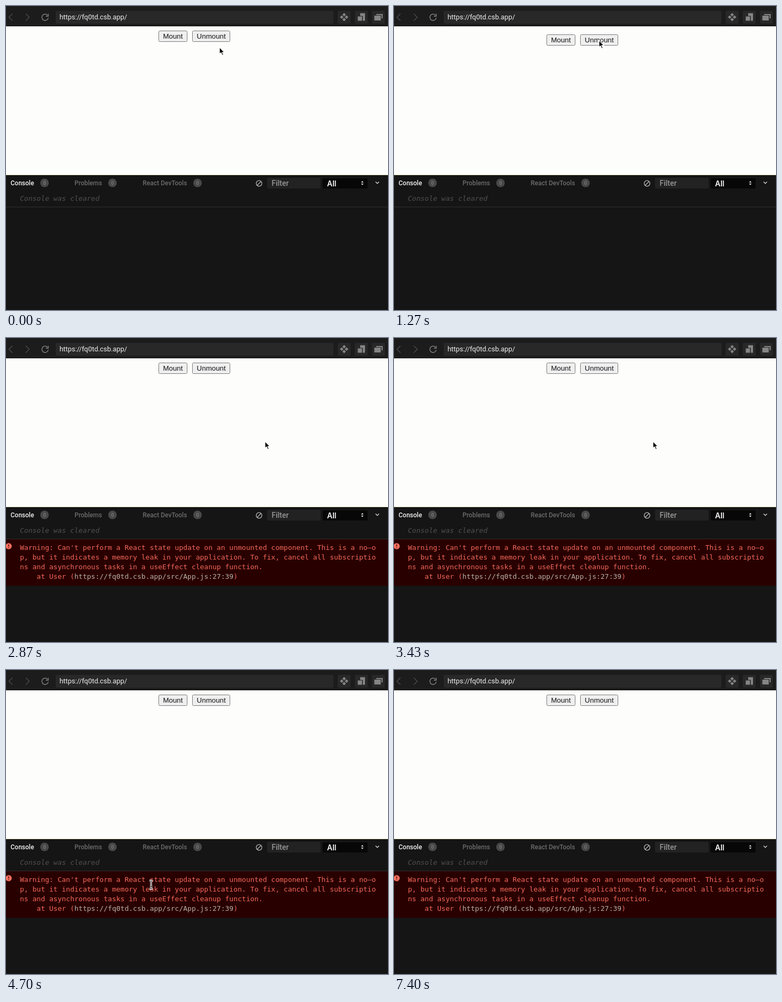
These frames come from a looping animation (714 px wide and 568 px high, 7.43 s). An HTML page:

```html
<!DOCTYPE html>
<html lang="en">
<head>
<meta charset="utf-8">
<title>Console warning</title>
<style>
html, body { margin: 0; width: 100%; height: 100%; overflow: hidden; background: #151515; }
svg { display: block; width: 714px; height: 568px; }
text { white-space: pre; }
.ui { font: 500 12px Roboto, sans-serif; }
.btn { font: 13.333px "Liberation Sans", Arial, sans-serif; fill: #111; }
.btn rect { fill: #efefef; stroke: #7c7c7c; }
.mono { font: 13px "DejaVu Sans Mono", monospace; }
.line { fill: none; stroke-width: 1.3; }
</style>
</head>
<body>
<svg viewBox="0 0 714 568">
  <rect width="714" height="568" fill="#151515"/>

  <!-- address bar -->
  <rect width="714" height="38" fill="#1c1c1c"/>
  <rect x="93" y="9" width="519" height="24" rx="2" fill="#282828"/>
  <g class="line" stroke="#4c4c4c">
    <path d="M12 14.500L5.500 21L12 27.500M37 14.500L43.500 21L37 27.500"/>
    <path d="M77.500 17A6 6 0 1 0 79 22M79 14.500V19H74.500" stroke="#8a8a8a"/>
  </g>
  <text x="100" y="25" class="ui" style="font-size:12.9px;font-weight:400" fill="#f0f0f0">https://fq0td.csb.app/</text>
  <g fill="#282828">
    <rect x="620" y="9" width="24" height="24" rx="2"/>
    <rect x="652" y="9" width="24" height="24" rx="2"/>
    <rect x="684" y="9" width="24" height="24" rx="2"/>
  </g>
  <g fill="#858585">
    <path d="M632 13l3.300 3.300-3.300 3.300-3.300-3.300zM632 22l3.300 3.300-3.300 3.300-3.300-3.300zM627.500 17.500l3.300 3.300-3.300 3.300-3.300-3.300zM636.500 17.500l3.300 3.300-3.300 3.300-3.300-3.300z"/>
    <path d="M662 13.500h9v14h-4v-9h-5zM657.500 19.500h8v8h-8z"/>
    <path d="M692 15h12v8h-2v-6h-10zM688.500 18h12v9h-12z"/>
  </g>

  <!-- page -->
  <rect y="38" width="714" height="278" fill="#fdfdfb"/>
  <rect y="315" width="714" height="1" fill="#e6e8c8"/>
  <g id="buttons" class="btn">
    <rect x="285.500" y="46.500" width="53" height="20" rx="2"/>
    <text x="293.400" y="61">Mount</text>
    <rect x="348.500" y="46.500" width="70" height="20" rx="2"/>
    <text x="356.600" y="61">Unmount</text>
  </g>

  <!-- console header -->
  <g class="ui">
    <text x="8.500" y="335" fill="#f2f2f2">Console</text>
    <text x="128" y="335" fill="#6c6c6c">Problems</text>
    <text x="255.500" y="335" fill="#6c6c6c">React DevTools</text>
    <g id="badges" text-anchor="middle"></g>
    <rect x="488" y="321" width="100" height="20" rx="2" fill="#222"/>
    <text x="496.500" y="336" style="font-size:14px" fill="#969696">Filter</text>
    <rect x="592" y="322" width="84" height="19" rx="2" fill="#070707"/>
    <text x="600" y="336.500" style="font:600 14px Inter,sans-serif" fill="#fafafa">All</text>
  </g>
  <g class="line" stroke="#b8b8b8">
    <circle cx="473" cy="331.500" r="5.300"/>
    <path d="M469.300 335.200L476.700 327.800"/>
    <path d="M690.800 328.500L694 331.700L697.200 328.500" stroke="#dedede"/>
  </g>
  <path d="M663.700 329.700L666 326.700L668.300 329.700zM663.700 331.700L666 334.700L668.300 331.700z" fill="#dedede"/>

  <!-- console messages -->
  <text x="26" y="364" class="mono" style="font-style:italic" fill="#505050">Console was cleared</text>
  <rect y="375" width="714" height="1" fill="#2e2e2e"/>
  <g id="warning" class="mono" fill="#f3695a">
    <rect y="376" width="714" height="87" fill="#290000"/>
    <circle cx="5" cy="389" r="5.700" fill="#f9705f"/>
    <path d="M5 385.500V389.800M5 391V392.500" stroke="#450800" stroke-width="1.400"/>
    <text x="26" y="396">Warning: Can't perform a React state update on an unmounted component. This is a no–o</text>
    <text x="26" y="414">p, but it indicates a memory leak in your application. To fix, cancel all subscriptio</text>
    <text x="26" y="432">ns and asynchronous tasks in a useEffect cleanup function.</text>
    <text x="26" y="450">    at User (<tspan fill="#b9b1a6">https://fq0td.csb.app/src/App.js:27:39</tspan>)</text>
  </g>

  <!-- pointers, with the hot spot at 0,0 -->
  <g id="arrow">
    <path d="M0 0V13L3 10.300L5.200 15.300L7.500 14.300L5.300 9.500H9.300Z" fill="#0a0a0a" stroke="#fff" stroke-width="1.200" stroke-linejoin="round"/>
  </g>
  <g id="beam" fill="none">
    <path id="stem" d="M-3 -8Q0 -8 0 -6Q0 -8 3 -8M0 -6V6M-3 8Q0 8 0 6Q0 8 3 8M-2 3H2" stroke="#fff" stroke-width="2.800"/>
    <use href="#stem" style="stroke:#1c0c0c"/>
    <path d="M-3 -8Q0 -8 0 -6Q0 -8 3 -8M0 -6V6M-3 8Q0 8 0 6Q0 8 3 8M-2 3H2" stroke="#1c0c0c"/>
  </g>
</svg>
<script>
const $ = id => document.getElementById(id);
const LOOP = 7430, MOUNT = 530, UNMOUNT = 1430, WARN = 2870, GONE = 5600;

$('badges').innerHTML = [72, 199, 358].map(x =>
  `<circle cx="${x}" cy="330.500" r="8" fill="#484848"/><text x="${x}" y="334" style="font-size:9px" fill="#7c7c7c">0</text>`
).join('');

// time, x, y of the pointer
const path = [
  [0, 399, 77], [60, 399, 77], [420, 304, 60], [560, 303, 61],
  [740, 297, 81], [830, 297, 81], [1300, 384, 64], [1500, 385, 65],
  [1790, 484, 193], [3500, 484, 193], [3900, 172.5, 400], [4350, 172.5, 400],
  [4950, 330, 402], [5200, 345, 402], [GONE, 722, 404]
];

function pointer(t) {
  const i = path.findIndex(p => p[0] > t);
  if (i < 0) return path[path.length - 1].slice(1);
  const [t0, x0, y0] = path[i - 1], [t1, x1, y1] = path[i];
  const u = (t - t0) / (t1 - t0), k = u * u * (3 - 2 * u);
  return [x0 + (x1 - x0) * k, y0 + (y1 - y0) * k];
}

function show(el, on) { el.style.display = on ? '' : 'none'; }

function draw(now) {
  const t = now % LOOP, [x, y] = pointer(t), overText = y > 346;
  const mounted = t >= MOUNT && t < UNMOUNT;
  $('buttons').setAttribute('transform', `translate(0 ${mounted ? 7 : 0})`);
  show($('warning'), t >= WARN);
  show($('arrow'), t < GONE && !overText);
  show($('beam'), t < GONE && overText);
  for (const id of ['arrow', 'beam']) $(id).setAttribute('transform', `translate(${x} ${y})`);
}

const start = performance.now();
function tick() {
  draw(performance.now() - start);
  requestAnimationFrame(tick);
}
tick();
</script>
</body>
</html>
```
